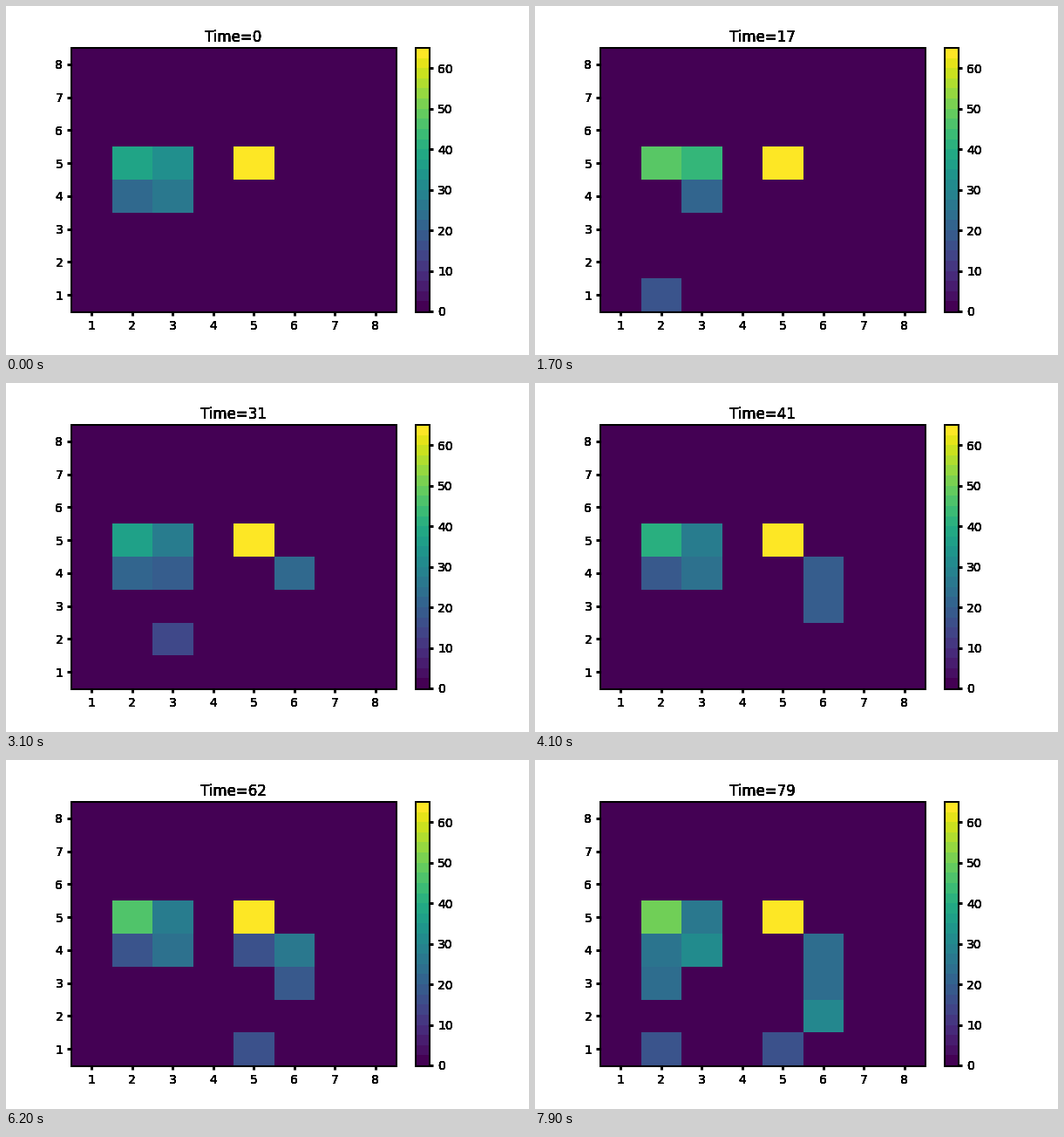
Write a matplotlib script that moves like this. It is 600 by 400 pixels and loops after 8000 ms.

```python
import numpy as np
import matplotlib.pyplot as plt
from matplotlib.animation import FuncAnimation
from matplotlib.cm import ScalarMappable
from matplotlib.colors import Normalize

FRAMES, SIZE, PEAK = 80, 8, 65
THICK = 2.16  # three pixels at 100 dpi

rng = np.random.default_rng(4)


def herd(*points):
    """Size drifting between (time, size) points; empty outside them."""
    t = np.arange(FRAMES)
    size = np.interp(t, *zip(*points), left=0, right=0)
    return np.where(size > 0, np.round(size) + rng.integers(-1, 2, FRAMES), 0)


def stay(start, end, size):
    return herd((start, size), (end, size))


def simulate():
    t = np.arange(FRAMES)
    end = FRAMES - 1
    row1 = (t > 9) & (t % 9 >= 7)          # regular short trips
    edge = (t < 31) & (t % 9 // 2 == 1)
    home = (t - 17) % 32 >= 8              # leaves every 32 steps
    cells = {
        (5, 5): np.full(FRAMES, PEAK),
        (2, 5): herd((0, 37), (17, 47), (31, 37), (end, 52)),
        (3, 5): herd((0, 31), (17, 42), (31, 28), (end, 25)),
        (3, 4): herd((0, 26), (31, 19), (41, 25), (62, 25), (end, 30)),
        (2, 4): home * herd((0, 21), (62, 18), (end, 25)),
        (6, 4): edge * 18 + herd((31, 22), (41, 18), (62, 26), (end, 22)),
        (6, 3): herd((36, 18), (62, 17), (end, 22)),
        (6, 2): stay(70, end, 30),
        (2, 3): stay(70, end, 22),
        (3, 2): stay(29, 33, 15),
        (5, 4): stay(58, 64, 17),
        (2, 1): row1 * ((t < 40) | (t > 75)) * 17,
        (5, 1): row1 * (t >= 40) * 16,
    }
    grid = np.zeros((FRAMES, SIZE, SIZE))
    for (x, y), size in cells.items():
        grid[:, y - 1, x - 1] = size
    return grid


def harden(text, times=8):
    """Draw a text several times over for crisp, heavy edges."""
    draw = text.draw

    def repeat(renderer):
        for _ in range(times):
            draw(renderer)

    text.draw = repeat


grid = simulate()
plt.rcParams.update({"font.family": "DejaVu Sans", "font.size": 10})
fig, ax = plt.subplots(figsize=(6, 4), dpi=100)
fig.subplots_adjust(left=0.125, right=0.9, bottom=0.125, top=0.88)

norm = Normalize(0, PEAK)
edges = np.arange(SIZE + 1) + 0.5
# The slight offset settles row edges that fall on half pixels.
mesh = ax.pcolormesh(edges, edges - 0.002, grid[0], cmap="viridis", norm=norm)
ax.set_ylim(0.5, SIZE + 0.5)
steps = ScalarMappable(norm, plt.get_cmap("viridis", 26))
bar = fig.colorbar(steps, ax=ax, ticks=range(0, 70, 10))

ax.set_xticks(range(1, SIZE + 1))
ax.set_yticks(range(1, SIZE + 1))
title = ax.set_title("Time=0", fontsize=12, pad=5.3)
for a in (ax, bar.ax):
    # A wide border under the cells thickens the frame on its outside.
    a.patch.set(edgecolor="black", linewidth=THICK)
    a.tick_params(width=THICK)
labels = ax.get_xticklabels() + ax.get_yticklabels() + bar.ax.get_yticklabels()
for text in [title, *labels]:
    harden(text)


def update(t):
    mesh.set_array(grid[t])
    title.set_text(f"Time={t}")
    return mesh, title


anim = FuncAnimation(fig, update, frames=FRAMES, interval=100,
                     repeat=True, repeat_delay=0, blit=False)
plt.show()
```
